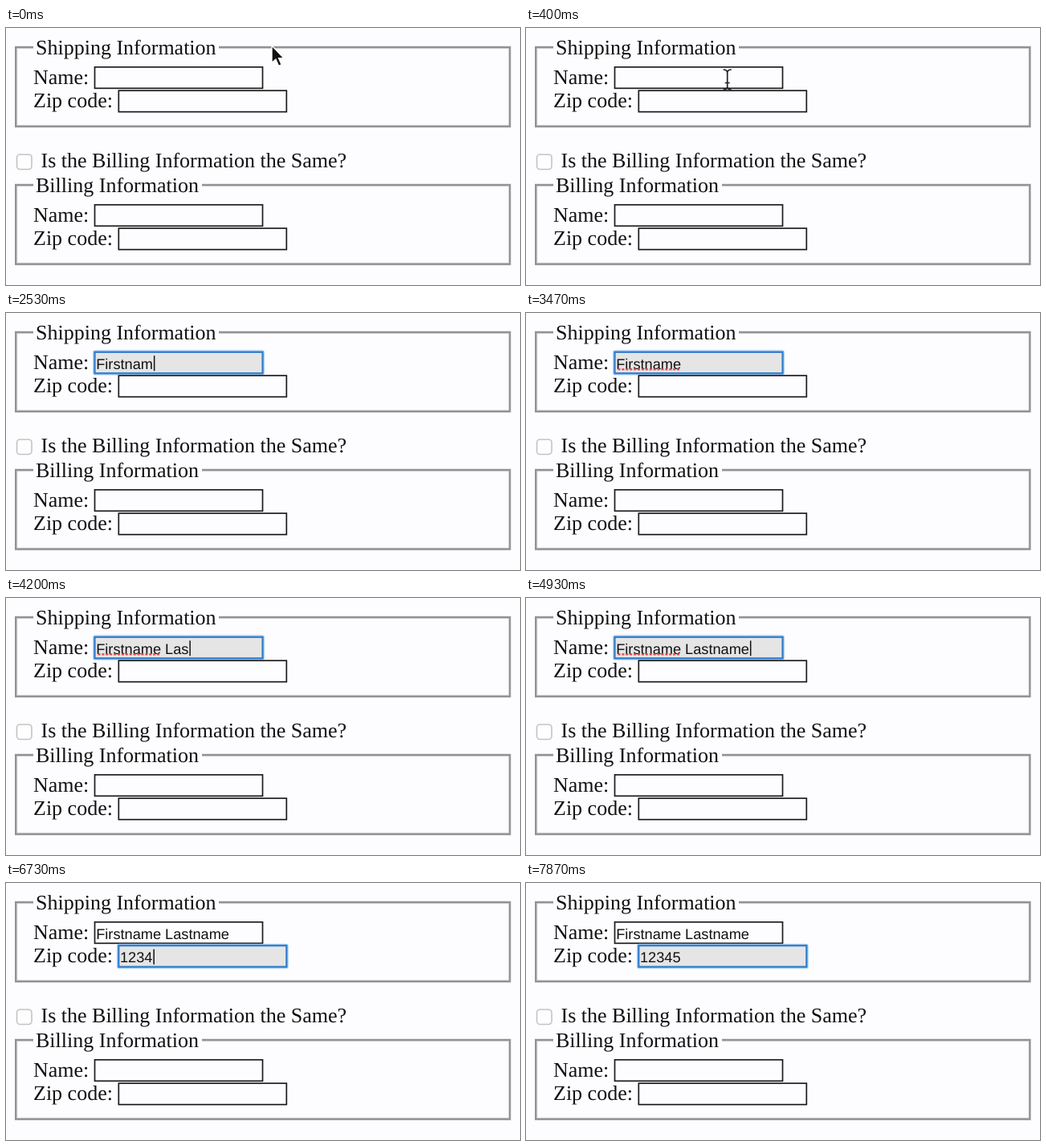
An HTML page that plays this animation: 640 by 321 pixels, repeating every 8 s.

```html
<!DOCTYPE html>
<html lang="en">
<head>
<meta charset="utf-8">
<title>Shipping form</title>
<style>
html, body { margin: 0; height: 100%; overflow: hidden; background: #fdfcfe; }
svg { display: block; width: 100vw; height: 100vh; }
text { font: 26px "Liberation Serif", Times, serif; fill: #111; white-space: pre; text-rendering: geometricPrecision; }
.typed { font: 18.2px "Liberation Sans", Arial, sans-serif; }
.field { fill: #fdfcfe; stroke: #1c1c1c; stroke-width: 1.7; }
.focus .field { fill: #e5e5e5; stroke: #2f7ccb; stroke-width: 2.2; }
.glow { fill: none; stroke: #86bdf3; stroke-width: 5; opacity: .65; visibility: hidden; }
.focus .glow { visibility: visible; }
.caret { stroke: #111; stroke-width: 1.5; }
.groove { fill: none; stroke: #929292; stroke-width: 2.4; }
.inner { fill: none; stroke: #dedede; stroke-width: 1; }
</style>
</head>
<body>
<svg id="stage" viewBox="0 0 640 321">
  <g id="form"></g>
  <rect x="13.5" y="158" width="18.5" height="18.5" rx="4" fill="#fefefe" stroke="#c3c3c3" stroke-width="1.6"/>
  <text x="43.5" y="174">Is the Billing Information the Same?</text>
  <path id="squiggle" d="M114.5 70.3H191" stroke="#e0464a" stroke-width="2.2" stroke-dasharray="3 1.9"/>
  <path id="arrow" d="M0 0V21.5L4.9 17L8.5 25.3L12 23.8L8.5 15.7H15Z" fill="#111" stroke="#fff" stroke-width="1.3"/>
  <path id="beam" d="M-5 -12.5Q0 -12.5 0 -8.5Q0 -12.5 5 -12.5M0 -9V9M-5 12.5Q0 12.5 0 8.5Q0 12.5 5 12.5M-3 4H3" fill="none" stroke="#222" stroke-width="1.7"/>
</svg>
<script>
const LOOP = 8000, BLINK = 530;
const CLICK = 530, TAB = 5330, CHECKED = 3070;
const $ = id => document.getElementById(id);
const show = (el, on) => el.setAttribute("visibility", on ? "visible" : "hidden");

function add(parent, tag, attrs, text = "") {
  const el = document.createElementNS("http://www.w3.org/2000/svg", tag);
  for (const key in attrs) el.setAttribute(key, attrs[key]);
  el.textContent = text;
  parent.append(el);
  return el;
}

function addField(x, y) {
  const g = add($("form"), "g", {});
  const box = { x, y, width: 209, height: 26.5 };
  add(g, "rect", { ...box, rx: 1, class: "glow" });
  add(g, "rect", { ...box, class: "field" });
  const text = add(g, "text", { x: x + 1.7, y: y + 21.2, class: "typed" });
  const caret = add(g, "path", { class: "caret" });
  return { g, x, y, text, caret };
}

function addFieldset(title, top, gap) {
  const form = $("form"), bottom = top + 99;
  add(form, "path", { class: "inner", d: `M34 ${top + 1.6}H13.8V${bottom - 1.6}H626.2V${top + 1.6}H${gap}` });
  add(form, "path", { class: "groove", d: `M34 ${top}H12.2V${bottom}H627.4V${top}H${gap}` });
  add(form, "text", { x: 37, y: top + 8.8 }, title);
  add(form, "text", { x: 34, y: top + 46 }, "Name:");
  add(form, "text", { x: 34, y: top + 75.3 }, "Zip code:");
  return [addField(110.5, top + 24.8), addField(140.3, top + 54.2)];
}

const [nameField, zipField] = addFieldset("Shipping Information", 24, 265);
addFieldset("Billing Information", 196, 244);

// Each key press is [time, character].
const keys = (text, start, step) => [...text].map((c, i) => [start + i * step, c]);
const nameKeys = [...keys("Firstname", 1735, 108), [2870, " "], ...keys("Lastname", 3930, 124)];
const zipKeys = keys("12345", 6140, 195);

function drawField(field, presses, from, to, t) {
  const done = presses.filter(([at]) => at <= t);
  const active = t >= from && t < to;
  const last = done.length ? done[done.length - 1][0] : from;
  field.text.textContent = done.map(([, c]) => c).join("");
  field.g.setAttribute("class", active ? "focus" : "");
  show(field.caret, active && (t - last) % (2 * BLINK) < BLINK);
  const end = field.x + 3.4 + (done.length ? field.text.getComputedTextLength() : 0);
  field.caret.setAttribute("d", `M${end} ${field.y + 4.5}v19`);
}

function drawPointer(t) {
  const p = Math.min(1, Math.max(0, (t - 70) / (CLICK - 90)));
  const k = p * p * (3 - 2 * p), r = 1 - k;
  const x = r * r * 331 + 2 * r * k * 328 + k * k * 220;
  const y = r * r * 22 + 2 * r * k * 78 + k * k * 61;
  const over = x < 320 && y > 48;
  for (const id of ["arrow", "beam"]) {
    $(id).setAttribute("transform", `translate(${x} ${y})`);
    show($(id), t < nameKeys[0][0] && over === (id === "beam"));
  }
}

function draw(now) {
  const t = now % LOOP;
  drawField(nameField, nameKeys, CLICK, TAB, t);
  drawField(zipField, zipKeys, TAB, LOOP, t);
  show($("squiggle"), t >= CHECKED && t < TAB);
  drawPointer(t);
}

const start = performance.now();
function frame() {
  draw(performance.now() - start);
  requestAnimationFrame(frame);
}
frame();
</script>
</body>
</html>
```
